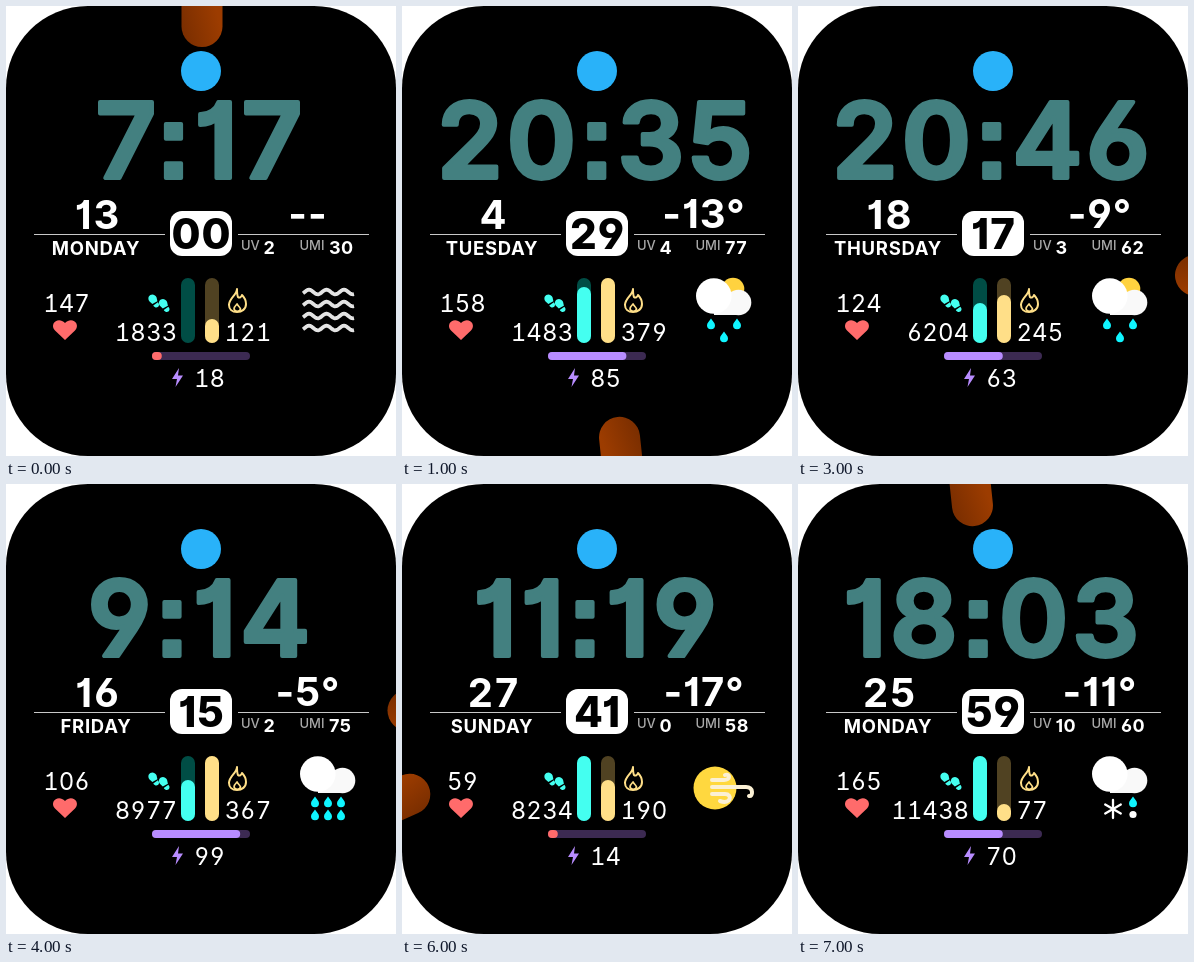
An HTML page with a canvas that plays this animation: 390x450 px, repeating every 8 s.

```html
<!DOCTYPE html>
<html lang="en">
<head>
<meta charset="utf-8">
<title>Watch face</title>
<style>
html, body { margin: 0; width: 100%; height: 100%; overflow: hidden; background: #fff; }
canvas, svg { position: absolute; left: 0; top: 0; width: 390px; height: 450px; }
text { font-family: Inter, Roboto, sans-serif; font-feature-settings: "cv01", "cv03", "cv04", "ss07"; }
.tabular { font-feature-settings: "tnum", "cv01", "cv03", "cv04"; }
.time { stroke: #438080; stroke-width: 4px; stroke-linejoin: round; }
</style>
</head>
<body>
<canvas id="stage" width="390" height="450"></canvas>
<svg id="labels" viewBox="0 0 390 450"></svg>
<script>
const ctx = document.getElementById('stage').getContext('2d');
const labels = document.getElementById('labels');
const TAU = Math.PI * 2;
const CYAN = '#44fff0', CREAM = '#ffdf88', RED = '#ff6b6b', PURPLE = '#b88cff';

// stepsLevel and burnLevel are the filled heights of the bars in pixels
const states = [
  { time: '7:17', sec: 0, day: '13', week: 'MONDAY', temp: '--', uv: 2, umi: 30, pulse: 147,
    steps: 1833, stepsLevel: 0, burn: 121, burnLevel: 24, battery: 18, sky: waves },
  { time: '20:35', sec: 29, day: '4', week: 'TUESDAY', temp: '-13°', uv: 4, umi: 77, pulse: 158,
    steps: 1483, stepsLevel: 56, burn: 379, burnLevel: 65, battery: 85, sky: sunShower },
  { time: '0:01', sec: 24, day: '26', week: 'WEDNESDAY', temp: '-6°', uv: 0, umi: 74, pulse: 169,
    steps: 11059, stepsLevel: 49, burn: 68, burnLevel: 16, battery: 85, sky: lightSnow },
  { time: '20:46', sec: 17, day: '18', week: 'THURSDAY', temp: '-9°', uv: 3, umi: 62, pulse: 124,
    steps: 6204, stepsLevel: 40, burn: 245, burnLevel: 48, battery: 63, sky: sunShower },
  { time: '9:14', sec: 15, day: '16', week: 'FRIDAY', temp: '-5°', uv: 2, umi: 75, pulse: 106,
    steps: 8977, stepsLevel: 41, burn: 367, burnLevel: 65, battery: 99, sky: rain },
  { time: '20:38', sec: 22, day: '22', week: 'SATURDAY', temp: '-8°', uv: 1, umi: 54, pulse: 92,
    steps: 7350, stepsLevel: 49, burn: 284, burnLevel: 56, battery: 47, sky: rain },
  { time: '11:19', sec: 41, day: '27', week: 'SUNDAY', temp: '-17°', uv: 0, umi: 58, pulse: 59,
    steps: 8234, stepsLevel: 65, burn: 190, burnLevel: 41, battery: 14, sky: windySun },
  { time: '18:03', sec: 59, day: '25', week: 'MONDAY', temp: '-11°', uv: 10, umi: 60, pulse: 165,
    steps: 11438, stepsLevel: 65, burn: 77, burnLevel: 17, battery: 70, sky: sleet },
];

function box(x, y, w, h, r, color) {
  ctx.fillStyle = color;
  ctx.beginPath();
  ctx.roundRect(x, y, w, h, r);
  ctx.fill();
}

function disc(x, y, r, color) {
  ctx.fillStyle = color;
  ctx.beginPath();
  ctx.arc(x, y, r, 0, TAU);
  ctx.fill();
}

function stroke(path, color, width) {
  ctx.strokeStyle = color;
  ctx.lineWidth = width;
  ctx.lineCap = ctx.lineJoin = 'round';
  ctx.stroke(new Path2D(path));
}

function fill(path, color) {
  ctx.fillStyle = color;
  ctx.fill(new Path2D(path));
}

function label(value, x, y, size, weight, { color = '#fff', anchor = 'start', spacing = 0, kind = '' } = {}) {
  return `<text class="${kind}" x="${x}" y="${y}" fill="${color}" text-anchor="${anchor}"
    font-size="${size}" font-weight="${weight}" letter-spacing="${spacing}">${value}</text>`;
}

function hand(sec) {
  ctx.save();
  ctx.translate(196, 226.5);
  ctx.rotate(sec / 60 * TAU);
  const shade = ctx.createLinearGradient(-20, -190, 20, -200);
  shade.addColorStop(0, '#782d00');
  shade.addColorStop(1, '#9c3c00');
  box(-20.5, -345.5, 41, 160, 20.5, shade);
  ctx.restore();
}

function cloud() {
  disc(336.5, 296.5, 12.8, '#f9f9f9');
  box(312, 297, 25, 12, 0, '#f9f9f9');
  disc(311.8, 290, 17.8, '#fff');
}

function drop(x, y) {
  ctx.save();
  ctx.translate(x, y);
  fill('M0-5.5C1.5-3 4-1 4 1.3A4 4 0 0 1-4 1.3C-4-1-1.5-3 0-5.5Z', '#0ff5ff');
  ctx.restore();
}

function flake(x, y, r, width) {
  for (let i = 0; i < 3; i++) {
    const a = Math.PI * (i / 3 + 0.5), dx = Math.cos(a) * r, dy = Math.sin(a) * r;
    stroke(`M${x - dx} ${y - dy}L${x + dx} ${y + dy}`, '#fff', width);
  }
}

function waves() {
  for (let row = 0; row < 4; row++) {
    ctx.beginPath();
    for (let x = 297; x <= 348; x++) {
      ctx.lineTo(x, 286 + row * 12 - 2.3 * Math.cos((x - 303) / 17.5 * TAU));
    }
    ctx.strokeStyle = '#e3e3e3';
    ctx.lineWidth = 3.8;
    ctx.lineCap = 'butt';
    ctx.stroke();
  }
}

function sunShower() {
  disc(331, 283, 11.3, '#ffd23f');
  cloud();
  drop(309, 318);
  drop(335, 318);
  drop(322, 331);
}

function lightSnow() {
  cloud();
  flake(322, 328, 3.8, 1.2);
}

function rain() {
  cloud();
  for (const y of [318, 331]) for (const x of [309, 322, 335]) drop(x, y);
}

function sleet() {
  cloud();
  flake(315, 325, 9, 2.3);
  drop(335, 318);
  disc(335, 330.5, 3.6, '#fff');
}

function windySun() {
  disc(313, 304, 21.5, '#ffd83f');
  const gust = '#fbf0d4';
  stroke('M310 296H322C329 296 328 289 323 291', gust, 4);
  stroke('M310 303H344C352 303 351 313 347 312', gust, 4);
  stroke('M310 310H323C331 310 329 321 318 317', gust, 4);
}

function footprints() {
  for (const [x, y] of [[147.5, 294], [158, 298.5]]) {
    ctx.save();
    ctx.translate(x, y);
    ctx.rotate(-0.5);
    fill('M-4.2-1C-5-7 3.8-8 4-1L2.8 3H-3Z', CYAN);
    fill('M-2.8 4.6L2.7 4.1C4 9-2.5 10-2.8 4.6Z', CYAN);
    ctx.restore();
  }
}

function flame() {
  stroke('M231 283C231 289 223 292 223 299C223 303 226 306 231 306C236 306 240 303 240 298' +
    'C240 294 238 291 236 289C235 292 233 292 232 291C231 289 231 286 231 283Z', CREAM, 2);
  stroke('M231 298C229 300 228 301 228 303C229 306 234 306 234.5 303C234 301 232 300 231 298Z', CREAM, 1.7);
}

function level(x, height, track, color) {
  box(x, 272, 14, 65, 7, track);
  if (height) box(x, 337 - height, 14, height, 7, color);
}

function drawShapes(s) {
  ctx.fillStyle = '#fff';
  ctx.fillRect(0, 0, 390, 450);
  ctx.save();
  ctx.beginPath();
  ctx.roundRect(0, 0, 390, 450, 82);
  ctx.clip();
  ctx.fillStyle = '#000';
  ctx.fillRect(0, 0, 390, 450);

  hand(s.sec);
  disc(195, 65, 20, '#29b2f9');
  box(28, 228, 131, 1, 0, '#c8c8c8');
  box(232, 228, 131, 1, 0, '#c8c8c8');
  box(164, 205, 62, 45, 12, '#fff');

  fill('M59 334L49 324.5C43 318 52 310 59 317C66 310 75 318 69 324.5Z', RED);
  footprints();
  flame();
  level(175, s.stepsLevel, '#004d45', CYAN);
  level(199, s.burnLevel, '#504222', CREAM);

  const charge = Math.floor((s.battery - 1) / 10) * 9.8;
  box(146, 346, 98, 8, 4, '#3c2a52');
  box(146, 346, charge, 8, 4, s.battery < 20 ? RED : PURPLE);
  fill('M173 362L166 373H171L169.5 381L177 369.5H172Z', PURPLE);

  s.sky();
  ctx.restore();
}

function drawLabels(s) {
  const kind = 'tabular', anchor = 'middle', gray = { color: '#aaa' };
  labels.innerHTML = [
    label(s.time, 195, 172, 105, 600, { color: '#438080', anchor, spacing: 4, kind: 'time' }),
    label(s.day, 92, 223, 40, 700, { anchor, spacing: 2 }),
    label(s.week, 90, 249, 18.5, 700, { anchor, spacing: 0.7 }),
    label(s.temp, 302, 222, 40, 700, { anchor, spacing: 1 }),
    label('UV', 235, 243.5, 13, 500, gray),
    label(s.uv, 257.5, 248, 18, 700, { spacing: 0.5 }),
    label('UMI', 293.5, 243.5, 13, 500, gray),
    label(s.umi, 323, 248, 18, 700, { spacing: 0.5 }),
    label(String(s.sec).padStart(2, '0'), 195.5, 243, 42, 800, { color: '#000', anchor, spacing: 1 }),
    label(s.pulse, 60.5, 305.5, 24, 400, { anchor, kind }),
    label(s.steps, 171, 334.5, 24, 400, { anchor: 'end', kind }),
    label(s.burn, 218.5, 334.5, 24, 400, { kind }),
    label(s.battery, 188, 380.5, 24, 400, { kind }),
  ].join('');
}

const start = performance.now();
let shown = null;
function tick() {
  const elapsed = performance.now() - start;
  const state = states[Math.floor(elapsed / 1000) % states.length];
  if (state !== shown) {
    drawShapes(state);
    drawLabels(state);
    shown = state;
  }
  requestAnimationFrame(tick);
}
tick();
</script>
</body>
</html>
```
